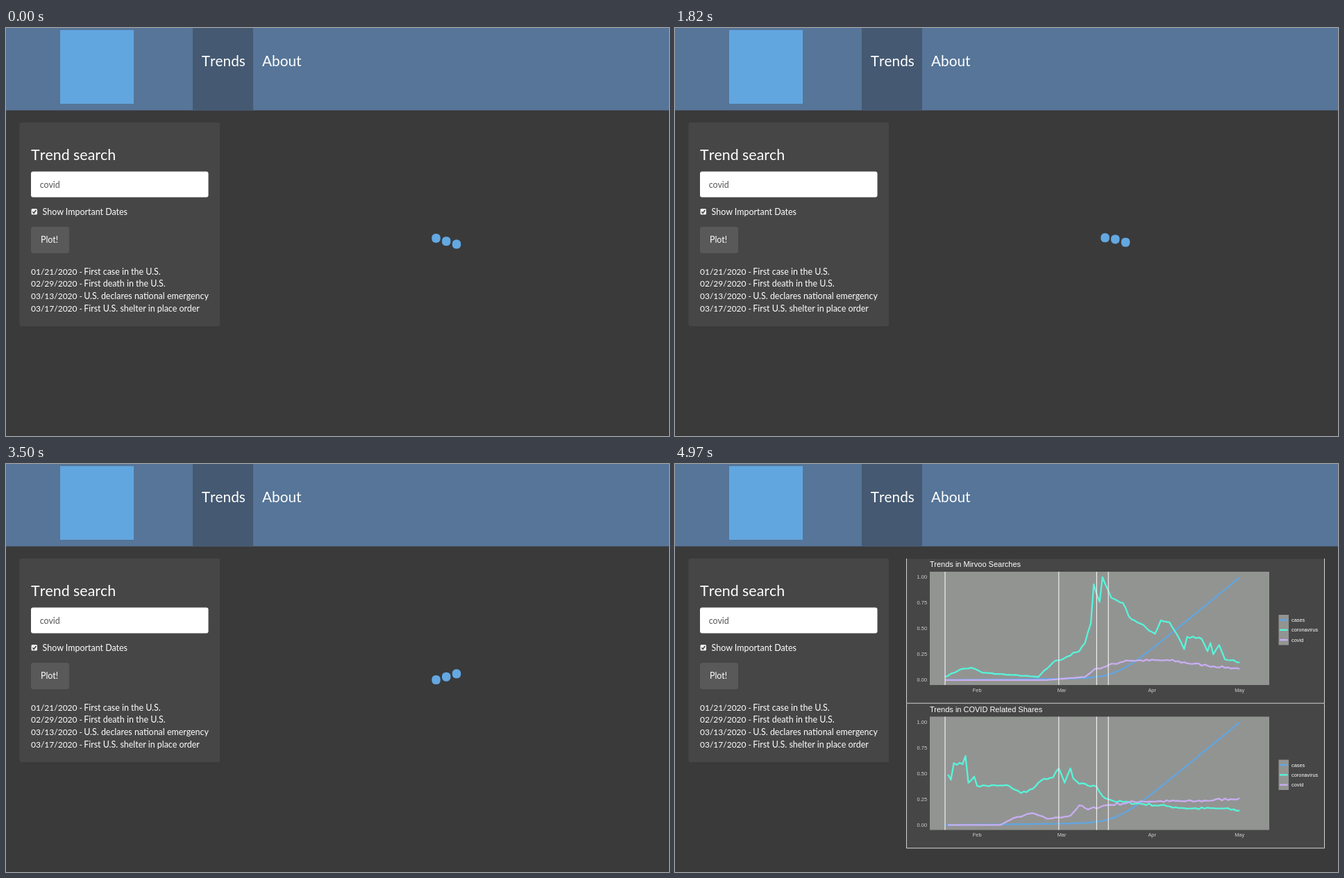
An HTML page for the animation above (5040 ms loop, 955 by 587 pixels).

```html
<!DOCTYPE html>
<html lang="en">
<head>
<meta charset="utf-8">
<title>Trend search</title>
<style>
  html, body { margin: 0; height: 100%; overflow: hidden; background: #3a3a3a; }
  svg { display: block; width: 100%; height: 100%; font: 12.45px Lato, sans-serif; fill: #fff; }
  .nav, .heading { font-size: 20.75px; font-kerning: none; }
  .heading { font-size: 21.4px; }
  .date { font-size: 12px; }
  .chart { font: 7.4px "Liberation Sans", Arial, sans-serif; }
  .chart .title { font-size: 11px; }
  .axis { fill: #d0d0d0; }
  .line { fill: none; stroke-width: 2.3; stroke-linejoin: round; }
</style>
</head>
<body>
<svg viewBox="0 0 955 587">
  <rect width="955" height="118.5" fill="#567598"/>
  <rect x="269" width="87" height="118.5" fill="#455972"/>
  <rect x="78" y="3" width="106" height="106" fill="#62a6df"/>
  <g class="nav">
    <text x="281.8" y="55">Trends</text>
    <text x="369" y="55">About</text>
  </g>

  <rect x="19.5" y="136" width="288.5" height="293" rx="2" fill="#464646"/>
  <text class="heading" x="36" y="189.5">Trend search</text>
  <rect x="36" y="206.5" width="255.5" height="37" rx="3"/>
  <text x="48.7" y="229.5" fill="#555">covid</text>
  <rect x="36.5" y="260" width="8.5" height="8.5" rx="1.5" fill="#eee"/>
  <path d="M38.4 264.4l1.7 1.9 3.2-4.3" fill="none" stroke="#333" stroke-width="1.4"/>
  <text x="52.6" y="269.3">Show Important Dates</text>
  <rect x="36" y="286" width="55" height="38" rx="3" fill="#595959"/>
  <text x="50" y="309.3">Plot!</text>
  <g id="dates"></g>

  <g id="dots" fill="#64a8e2"></g>
  <g id="charts" class="chart"></g>
</svg>
<script>
const LOOP = 5040, STEP = 70, PLOT_AT = 3570;
const BOUNCE = { period: 630, lag: 105, mid: 307.2, range: 13 };
const COLORS = { cases: '#62a6e0', coronavirus: '#56f5da', covid: '#c9aef2' };
const LAST_DAY = 101, CHART_GAP = 208.5;

// Key points are "day:value", with a small daily wobble in between.
const charts = [
  { title: 'Trends in Mirvoo Searches',
    coronavirus: `0:.03 5:.1 9:.12 13:.07 32:.03 37:.17 46:.28 48:.36 50:.55 51:.93 53:.76 54:1 57:.8
      61:.75 63:.62 72:.45 74:.58 77:.56 80:.42 82:.3 83:.42 88:.4 90:.28 91:.36 92:.25 94:.34 96:.2 101:.17`,
    covid: '0:0 35:0 48:.03 51:.1 62:.19 77:.19 90:.14 101:.11' },
  { title: 'Trends in COVID Related Shares',
    coronavirus: `1:.49 2:.44 3:.6 6:.59 7:.67 8:.41 10:.47 11:.38 22:.38 26:.31 30:.35 34:.45 37:.46
      39:.55 41:.41 43:.55 44:.45 46:.4 52:.37 54:.28 58:.23 77:.18 84:.16 95:.16 101:.14`,
    covid: '1:0 19:0 23:.06 30:.115 35:.06 41:.08 43:.09 46:.19 49:.15 55:.19 67:.23 86:.23 101:.26' }
];

const $ = id => document.getElementById(id);
const text = (x, y, value, attrs = '') => `<text x="${x}" y="${y}" ${attrs}>${value}</text>`;
const polyline = (name, points) =>
  `<polyline class="line" stroke="${COLORS[name]}" points="${points}"/>`;
const dayX = day => 389 + 4.2 * day;
const valueY = value => 310.8 - 148 * value;
const plot = (name, valueAt, first = 0) => {
  const points = [];
  for (let day = first; day <= LAST_DAY; day++) points.push([dayX(day), valueY(valueAt(day))]);
  return polyline(name, points.join(' '));
};

// Slow start that bends into steady growth.
const totalCases = day => .0003 * day + .0916 * Math.log(1 + Math.exp((day - 58.8) / 4));

function plotKeys(name, keyText) {
  const keys = keyText.trim().split(/\s+/).map(key => key.split(':').map(Number));
  let seed = 7;
  const random = () => (seed = seed * 16807 % 2147483647) / 2147483647;
  return plot(name, day => {
    const next = Math.max(1, keys.findIndex(key => key[0] >= day));
    const [[d0, v0], [d1, v1]] = [keys[next - 1], keys[next]];
    const value = v0 + (v1 - v0) * (day - d0) / (d1 - d0);
    const wobble = day === d0 || day === d1 ? 0 : (random() - .5) * .025;
    return value + wobble * Math.min(1, value * 6);
  }, keys[0][0]);
}

function drawChart({ title, coronavirus, covid }, index) {
  const yAxis = [0, .25, .5, .75, 1].map(v =>
    text(363, valueY(v) + 2.6, v.toFixed(2), 'class="axis" text-anchor="end"'));
  const xAxis = Object.entries({ Feb: 11, Mar: 40, Apr: 71, May: 101 }).map(([month, day]) =>
    text(dayX(day), 327.6, month, 'class="axis" text-anchor="middle"'));
  const events = [0, 39, 52, 56].map(day => `M${dayX(day)} 155v163`).join('');
  const legend = Object.keys(COLORS).map((name, i) => {
    const y = 224.5 + 14.3 * i;
    return polyline(name, `871,${y} 882.5,${y}`) + text(888, y + 2.6, name);
  });
  return `<g transform="translate(0 ${index * CHART_GAP})">
    <rect x="333" y="136.5" width="603" height="208" fill="#464646"/>
    <path d="M333.5 136V344.2H935.5V136" fill="none" stroke="#d4d4d4"/>
    ${text(367, 148.2, title, 'class="title"')}
    <path d="M367 155h489v163H367zM869.5 217h14.5v43.5h-14.5z" fill="#929492"/>
    ${plot('cases', totalCases)}
    ${plotKeys('coronavirus', coronavirus)}
    ${plotKeys('covid', covid)}
    <path d="${events}" stroke="#eee" stroke-width="1.2"/>
    ${[...yAxis, ...xAxis, ...legend].join('')}
  </g>`;
}

$('dates').innerHTML = Object.entries({
  '01/21/2020': 'First case in the U.S.',
  '02/29/2020': 'First death in the U.S.',
  '03/13/2020': 'U.S. declares national emergency',
  '03/17/2020': 'First U.S. shelter in place order'
}).map(([date, event], i) => {
  const y = 354.6 + 17.65 * i;
  return text(36, y, date + ' -', 'class="date"') + text(112.2, y, event);
}).join('');

$('charts').innerHTML = charts.map(drawChart).join('');
$('dots').innerHTML = [619.5, 634.2, 649].map(x =>
  `<rect x="${x - 6.2}" y="-6.5" width="12.4" height="13" rx="5.4"/>`).join('');
const dots = [...$('dots').children];

// Linear up-and-down travel, the right dot leading.
function bounceY(time, index) {
  const { period, lag, mid, range } = BOUNCE;
  const cycle = ((time - 10 + (index - 1) * lag) / period + 1.25) % 1;
  return mid + range * (.5 - Math.abs(2 * cycle - 1));
}

function render(now) {
  const time = Math.floor(now % LOOP / STEP) * STEP;
  const plotted = time >= PLOT_AT;
  $('charts').style.display = plotted ? '' : 'none';
  $('dots').style.display = plotted ? 'none' : '';
  dots.forEach((dot, i) => dot.setAttribute('transform', `translate(0 ${bounceY(time, i)})`));
  requestAnimationFrame(render);
}
render(performance.now());
</script>
</body>
</html>
```
